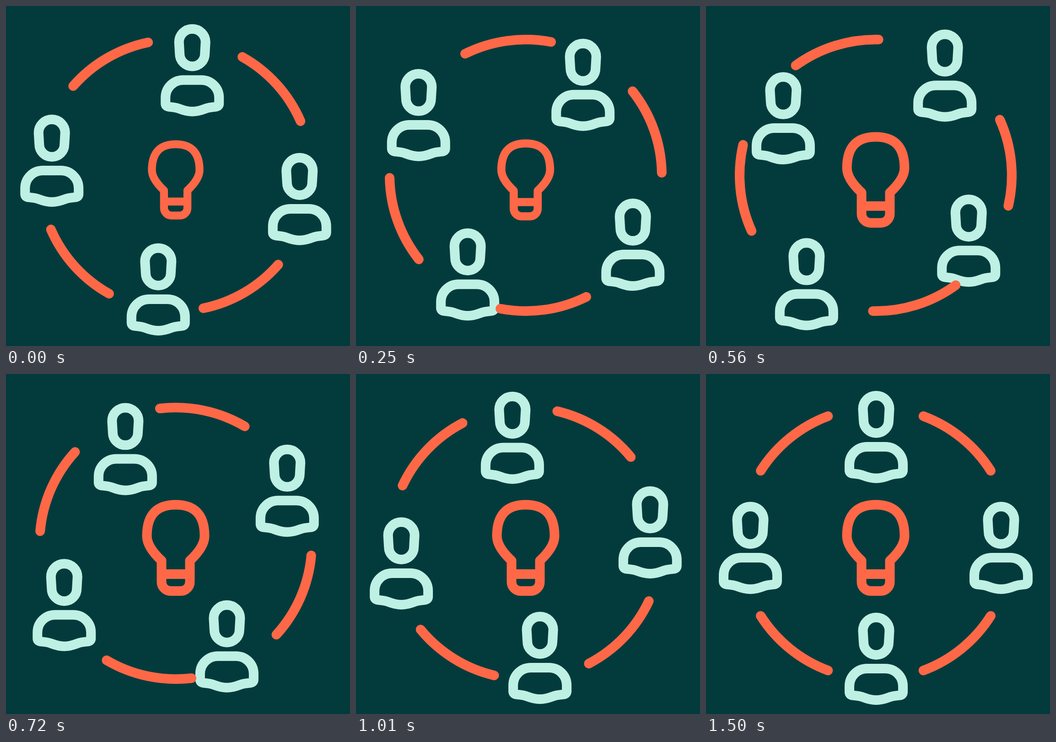
Recreate the animation shown at these times as an HTML page with a canvas. Size 752x745 px, loop 1.87 s.

```html
<!DOCTYPE html>
<html lang="en">
<head>
<meta charset="utf-8">
<title>Shared idea</title>
<style>
  html, body { margin: 0; width: 100%; height: 100%; overflow: hidden; background: #033b3c; }
  canvas { display: block; }
</style>
</head>
<body>
<canvas id="stage" width="752" height="745"></canvas>
<script>
const ctx = document.getElementById('stage').getContext('2d');
const LOOP = 1870, STROKE = 21;
const BACKGROUND = '#033b3c', MINT = '#bff0e4', ORANGE = '#ff6847';
const RAD = Math.PI / 180;

// Paths are drawn around their own centre.
const person = new Path2D(
  'M-29 -61.5 A29 29 0 0 1 29 -61.5 L27.5 -36 A27.5 27.5 0 0 1 -27.5 -36 Z ' +
  'M-20 21.5 H20 A38.5 38.5 0 0 1 58.5 60 V73 Q58.5 79 52 80 ' +
  'C40 81 33 82.5 28 84.5 C19 88 10 90.5 0 90.5 ' +
  'C-10 90.5 -19 88 -28 84.5 C-33 82.5 -40 81 -52 80 ' +
  'Q-58.5 79 -58.5 73 V60 A38.5 38.5 0 0 1 -20 21.5 Z');
const bulb = new Path2D(
  'M-31 28 C-47 13 -63 -7 -63 -26 C-63 -75 -39 -94.5 0 -94.5 ' +
  'C39 -94.5 63 -75 63 -26 C63 -7 47 13 31 28 ' +
  'V74 A20 20 0 0 1 11 94.5 H-11 A20 20 0 0 1 -31 74 Z M-31 57.5 H31');

const hub = { x: 371, y: 381 };
const ring = { x: 371, y: 371, radius: 297.5, half: 18.6 };
const seats = [[-1, -243], [274, 0], [-1, 243], [-274, 0]];
const arcAngles = [-50.9, 50.9, 129.1, -129.1];

const clamp = v => Math.min(1, Math.max(0, v));

// Symmetric S-curve: cubic-bezier(p, 0, 1 - p, 1)
function ease(x, p) {
  x = clamp(x);
  let lo = 0, hi = 1;
  for (let i = 0; i < 30; i++) {
    const s = (lo + hi) / 2, r = 1 - s;
    const bx = 3 * r * r * s * p + 3 * r * s * s * (1 - p) + s * s * s;
    if (bx < x) lo = s; else hi = s;
  }
  return lo * lo * (3 - 2 * lo);
}

function turn(t) {
  const lag = 31 * clamp(1 - t / 250);
  return 180 * RAD * ease((t - lag + 530) / 2000, 0.79);
}

function strokeAt(path, x, y, color, scale = 1) {
  ctx.save();
  ctx.translate(x, y);
  ctx.scale(scale, scale);
  ctx.strokeStyle = color;
  ctx.stroke(path);
  ctx.restore();
}

function draw(t) {
  ctx.fillStyle = BACKGROUND;
  ctx.fillRect(0, 0, 752, 745);
  ctx.lineWidth = STROKE;
  ctx.lineCap = ctx.lineJoin = 'round';

  const angle = turn(t), c = Math.cos(angle), s = Math.sin(angle);
  for (const [x, y] of seats) {
    strokeAt(person, hub.x + x * c - y * s, hub.y + x * s + y * c, MINT);
  }

  ctx.strokeStyle = ORANGE;
  for (const a of arcAngles) {
    ctx.beginPath();
    ctx.arc(ring.x, ring.y, ring.radius,
      angle + (a - ring.half) * RAD, angle + (a + ring.half) * RAD);
    ctx.stroke();
  }

  strokeAt(bulb, hub.x, hub.y, ORANGE, 0.826 + 0.174 * ease((t - 45) / 600, 0.8));
}

const start = performance.now();
function tick() {
  draw((performance.now() - start) % LOOP);
  requestAnimationFrame(tick);
}
tick();
</script>
</body>
</html>
```
